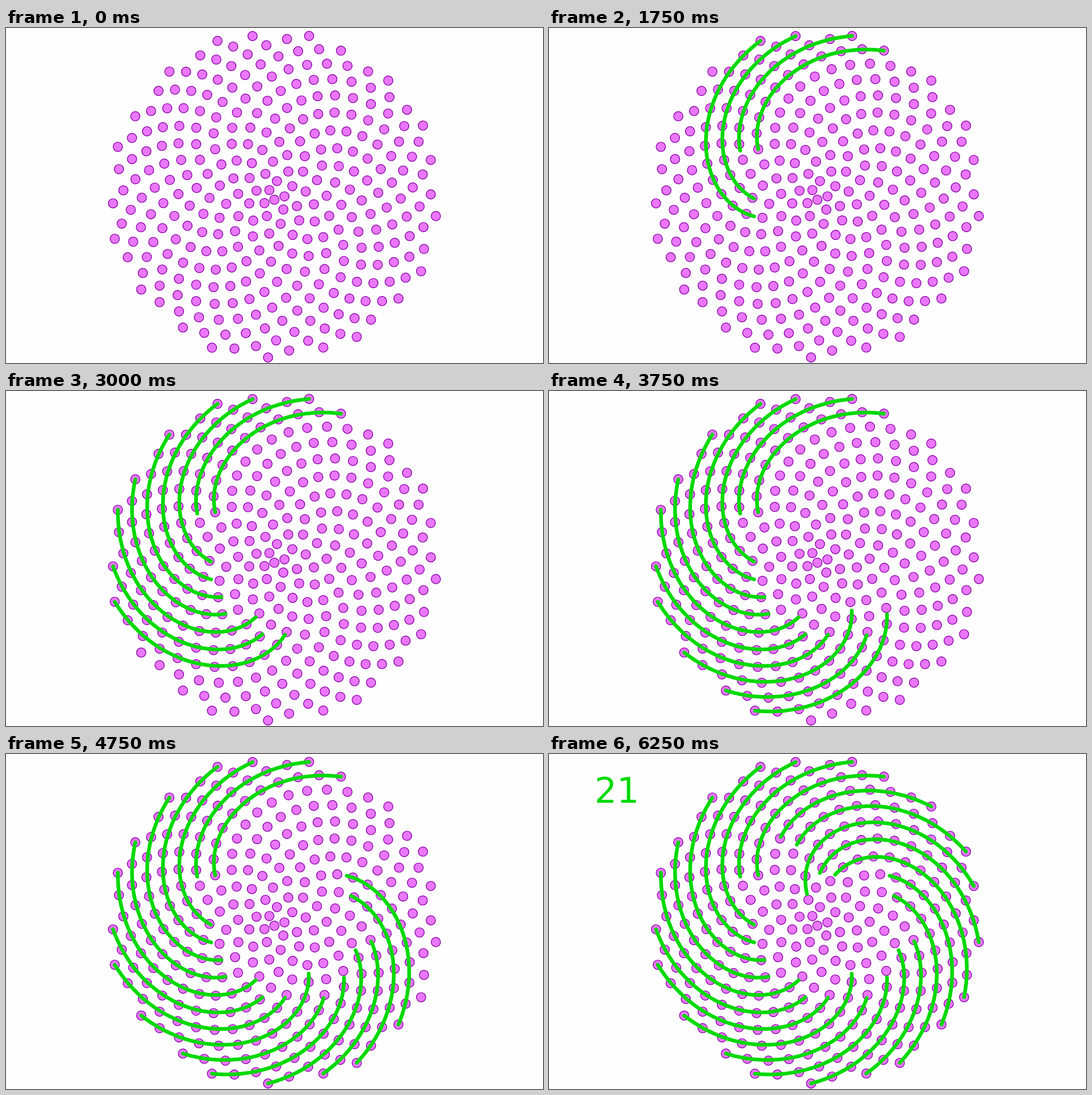
An HTML page for the animation above (8000 ms loop, 947x591 px).

```html
<!DOCTYPE html>
<html lang="en">
<head>
<meta charset="utf-8">
<title>Sunflower spirals</title>
<style>
  html, body { margin: 0; width: 100%; height: 100%; overflow: hidden; background: #fefefe; }
  svg { display: block; width: 947px; height: 591px; }
  .dot { fill: #ea77fe; stroke: #8c08a8; stroke-width: 1.4; }
  .arm { fill: none; stroke: #00d900; stroke-width: 6.5; stroke-linecap: round; stroke-linejoin: round; }
  text { font: 61.5px "DejaVu Sans", sans-serif; fill: #00d900; }
</style>
</head>
<body>
<svg viewBox="0 0 947 591"></svg>
<script>
const LOOP = 8000, FIRST = 1000, STEP = 250;
const DOTS = 300, ARMS = 21;
const TURN = 2 * Math.PI;
const GOLDEN = Math.PI * (3 - Math.sqrt(5));
const ARM_TURN = (ARMS * GOLDEN) % TURN;  // angle between neighbouring dots of one arm
const SAG = 2;                            // how far a stroke bows inwards
const SAMPLES = 40;

// How many dots each stroke runs past before it stops.
const reach = [10, 9.4, 11.1, 11.5, 11.2, 10.2, 11.7, 10.2, 10.8, 11.5, 8.8,
  9.6, 9.5, 7.9, 10.2, 9.4, 12.6, 12.3, 12.8, 10.4, 8.9];

const svg = document.querySelector("svg");

function add(tag, attrs) {
  const el = document.createElementNS("http://www.w3.org/2000/svg", tag);
  for (const key in attrs) el.setAttribute(key, attrs[key]);
  return svg.appendChild(el);
}

const radius = n => 17.84 * (Math.sqrt(n + 1) - 1);
const angle = n => TURN / 4 + GOLDEN * (n - 1);
const polar = (r, a) => [473.3 + r * Math.cos(a), 295.5 + r * Math.sin(a)];

// The smooth spiral through every 21st dot, from the rim inwards.
function armPoints(outer, length) {
  return Array.from({ length: SAMPLES + 1 }, (_, i) => {
    const u = i / SAMPLES, step = u * length;
    const r = radius(outer - ARMS * step) - SAG * Math.sin(Math.PI * u);
    return polar(r, angle(outer) - ARM_TURN * step).map(v => v.toFixed(1));
  });
}

function showAt(el, ms) {
  const offset = ms / LOOP;
  el.animate(
    [{ opacity: 0 }, { opacity: 0, offset }, { opacity: 1, offset }, { opacity: 1 }],
    { duration: LOOP, iterations: Infinity }
  );
}

for (let n = 1; n <= DOTS; n++) {
  const [cx, cy] = polar(radius(n), angle(n));
  add("circle", { class: "dot", cx, cy, r: 8.2 });
}

// Stepping 13 dots along the rim moves to the next arm counter-clockwise.
reach.forEach((length, i) => {
  const outer = DOTS - ARMS + 1 + (13 * i) % ARMS;
  const arm = add("polyline", { class: "arm", points: armPoints(outer, length).join(" ") });
  showAt(arm, FIRST + i * STEP);
});

const label = add("text", { x: 80.5, y: 86 });
label.textContent = ARMS;
showAt(label, FIRST + ARMS * STEP);
</script>
</body>
</html>
```
